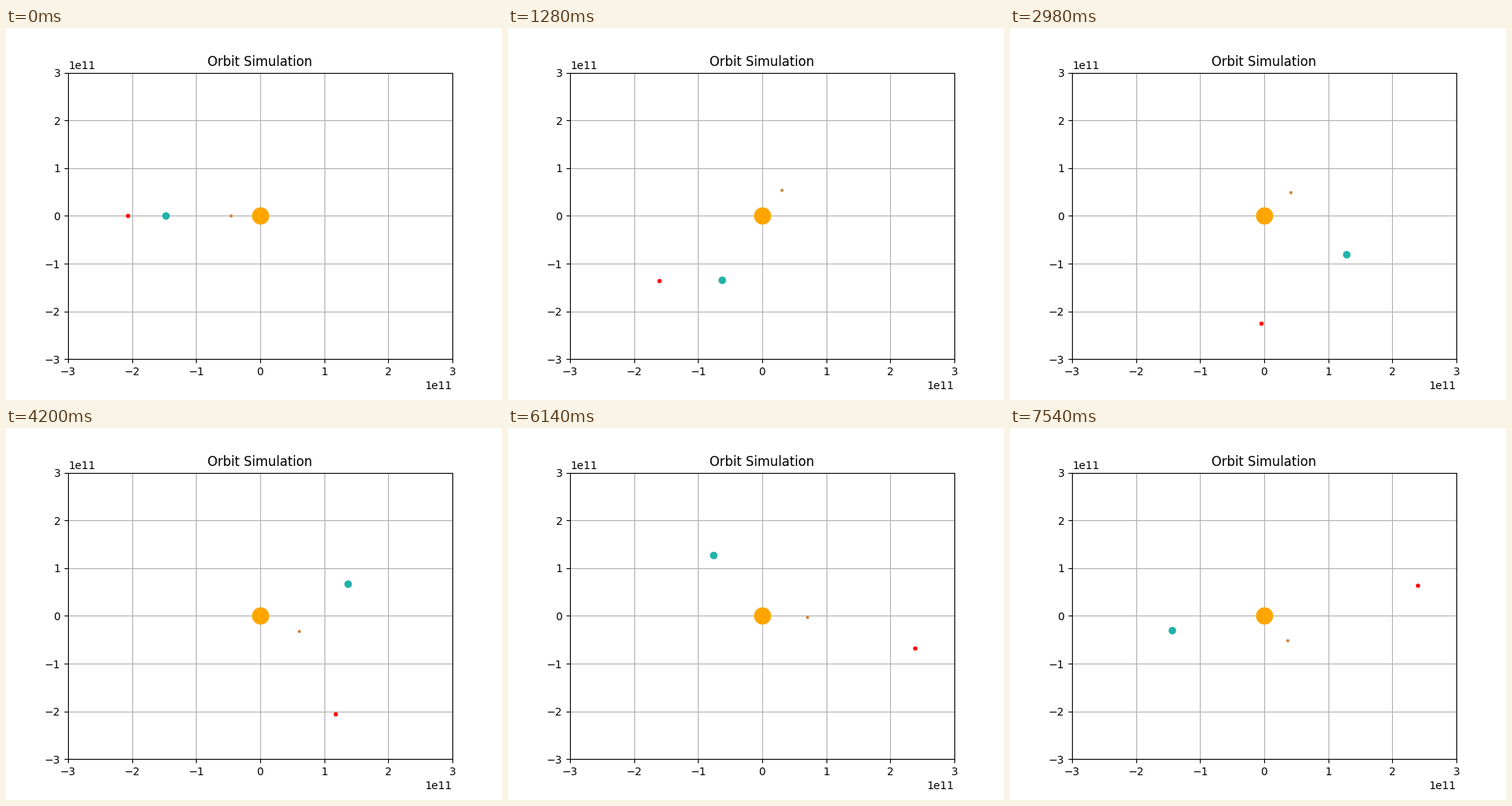
A matplotlib script for the animation above (7560 ms loop, 640 by 480 pixels).

```python
import numpy as np
import matplotlib.pyplot as plt
from matplotlib.animation import FuncAnimation

GM = 6.6743e-11 * 1.989e30
DAY = 86400
DAYS = 378

# perihelion distance (m), speed there (m/s), colour, marker size
PLANETS = [
    (46.0e9, 58.98e3, "peru", 2),
    (147.09e9, 30.29e3, "lightseagreen", 6),
    (206.62e9, 26.50e3, "red", 3),
]


def orbit(r0, v0, t):
    """Kepler orbit that starts at perihelion on the negative x axis."""
    a = 1 / (2 / r0 - v0**2 / GM)
    e = 1 - r0 / a
    mean = np.sqrt(GM / a**3) * t
    ecc = mean + e * np.sin(mean)
    for _ in range(8):
        ecc -= (ecc - e * np.sin(ecc) - mean) / (1 - e * np.cos(ecc))
    return -a * (np.cos(ecc) - e), -a * np.sqrt(1 - e * e) * np.sin(ecc)


fig, ax = plt.subplots(figsize=(6.4, 4.8), dpi=100)
ax.set_title("Orbit Simulation")
ax.set_xlim(-3e11, 3e11)
ax.set_ylim(-3e11, 3e11)
ax.grid()

ax.plot([0], [0], "o", color="orange", markersize=15)
times = np.arange(DAYS) * DAY
paths = [orbit(r, v, times) for r, v, _, _ in PLANETS]
dots = [ax.plot([], [], "o", color=c, markersize=s)[0] for _, _, c, s in PLANETS]


def update(day):
    for dot, (x, y) in zip(dots, paths):
        dot.set_data([x[day]], [y[day]])
    return dots


anim = FuncAnimation(fig, update, frames=DAYS, interval=20, repeat=True, repeat_delay=0)
plt.show()
```
